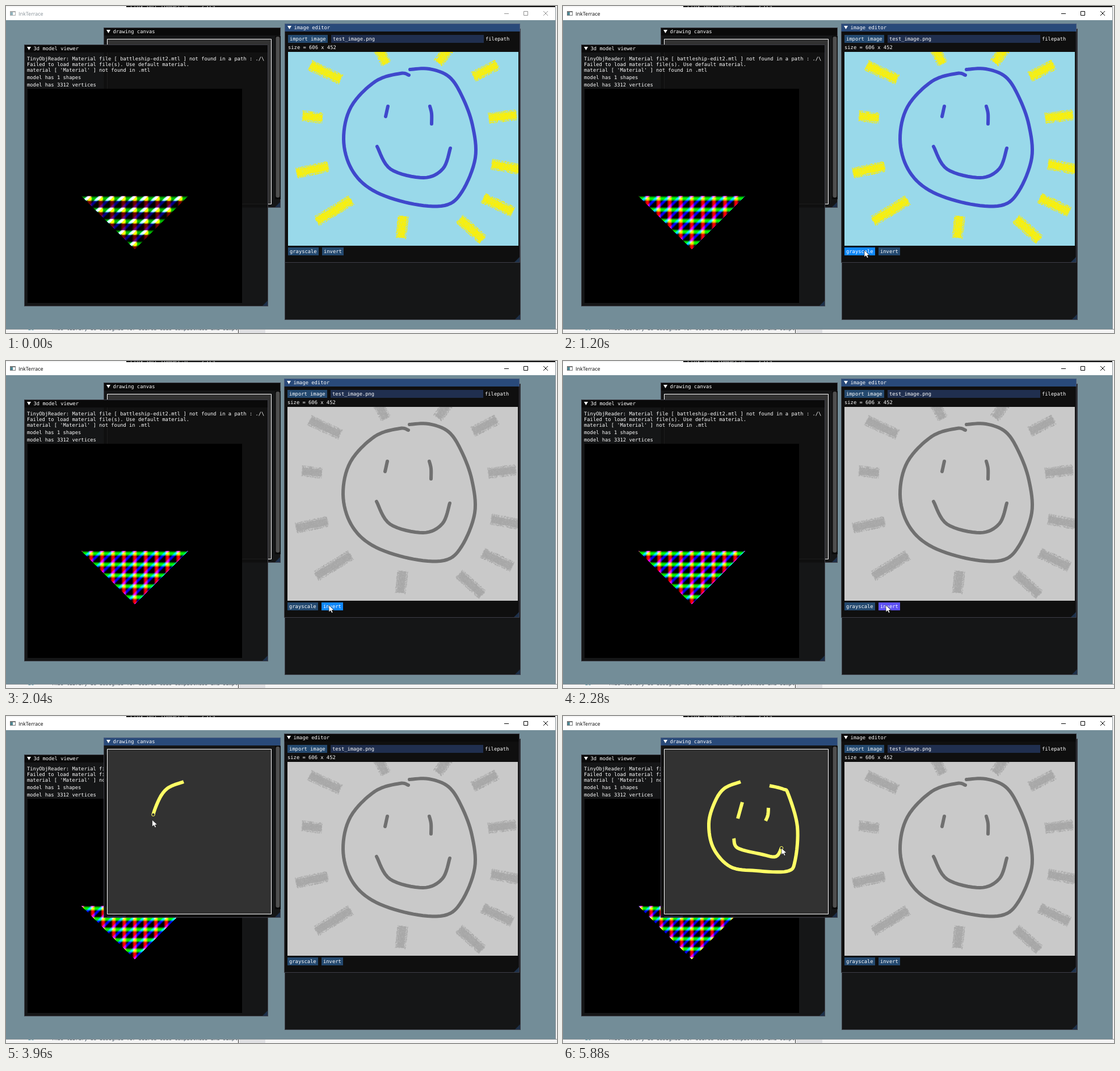
An HTML page with a canvas that plays this animation: 971x577 px, repeating every 6 s.

```html
<!DOCTYPE html>
<html lang="en">
<head>
<meta charset="utf-8">
<style>
html, body { margin: 0; width: 100%; height: 100%; overflow: hidden; background: #738d98; }
canvas { display: block; }
</style>
</head>
<body>
<canvas id="stage" width="971" height="577"></canvas>
<script>
const ctx = document.getElementById('stage').getContext('2d');
const LOOP = 6000, STEP = 120;
const MONO = '8.8px "DejaVu Sans Mono", monospace';
const UI = '9px "Open Sans", sans-serif';
const BLUE = '#294a7a', BUTTON = '#24496f', FIELD = '#202f4f';

function rect(x, y, w, h, color) {
  ctx.fillStyle = color;
  ctx.fillRect(x, y, w, h);
}

function frame(x, y, w, h, color) {
  ctx.strokeStyle = color;
  ctx.lineWidth = 1;
  ctx.strokeRect(x + .5, y + .5, w - 1, h - 1);
}

function poly(color, ...p) {
  ctx.fillStyle = color;
  ctx.beginPath();
  for (let i = 0; i < p.length; i += 2) ctx.lineTo(p[i], p[i + 1]);
  ctx.closePath();
  ctx.fill();
}

function text(s, x, y, color = '#fff', font = MONO) {
  ctx.font = font;
  ctx.fillStyle = color;
  ctx.fillText(s, x, y + 3);
}

function clipped(x, y, w, h, paint) {
  ctx.save();
  ctx.beginPath();
  ctx.rect(x, y, w, h);
  ctx.clip();
  paint();
  ctx.restore();
}

function button(label, x, y, w, color = BUTTON) {
  rect(x, y, w, 14, color);
  text(label, x + 3, y + 7);
}

function panel(x, y, w, h, title, active) {
  rect(x, y, w, h, 'rgba(15,15,15,.94)');
  if (title) {
    rect(x, y, w, 14, active ? BLUE : '#0a0a0a');
    poly('#fff', x + 5, y + 4, x + 12, y + 4, x + 8.5, y + 10);
    text(title, x + 16.5, y + 7);
  }
  frame(x, y, w, h, 'rgba(110,110,128,.5)');
  poly('#1d304a', x + w - 1, y + h - 10, x + w - 1, y + h - 1, x + w - 10, y + h - 1);
}

function offscreen(w, h) {
  const c = document.createElement('canvas');
  c.width = w;
  c.height = h;
  return c;
}

// Catmull-Rom curve through a few key points, as a list of points
function curve(...k) {
  const n = k.length / 2, out = [];
  const at = (i, d) => k[Math.min(n - 1, Math.max(0, i)) * 2 + d];
  const mix = (i, u, d) => {
    const a = at(i - 1, d), b = at(i, d), c = at(i + 1, d), e = at(i + 2, d);
    return b + u / 2 * (c - a + u * (2 * a - 5 * b + 4 * c - e + u * (3 * (b - c) + e - a)));
  };
  for (let s = 0; s <= (n - 1) * 8; s++) {
    const i = Math.floor(s / 8), u = s / 8 - i;
    out.push([mix(i, u, 0), mix(i, u, 1)]);
  }
  return out;
}

function stroke(g, points, color, width) {
  g.strokeStyle = color;
  g.lineWidth = width;
  g.lineJoin = 'round';
  g.beginPath();
  for (const p of points) g.lineTo(...p);
  g.stroke();
}

// Smiling sun picture
const SUN = [
  curve(709,122, 694,119, 650,133, 607,178, 594,235, 608,288, 645,325, 710,348, 772,352,
    803,327, 826,268, 821,210, 803,160, 780,125, 745,111, 711,112),
  curve(672,177, 668,195),
  curve(746,177, 749,190, 749,208),
  curve(653,248, 677,288, 735,303, 769,287, 782,251)
];
// Ray middles and lengths
const RAYS = [[562,117,58], [662,88,30], [770,88,30], [844,114,46], [874,195,48], [881,284,52],
  [866,351,56], [819,394,54], [697,390,38], [577,361,70], [539,289,56], [539,196,34]];

function makeSun(bg, ink, ray) {
  const c = offscreen(406, 342), g = c.getContext('2d');
  let seed = 7;
  const rnd = () => (seed = seed * 16807 % 2147483647) / 2147483647;
  g.fillStyle = bg;
  g.fillRect(0, 0, 406, 342);
  g.translate(-496, -81);
  for (const [x, y, len] of RAYS) {
    g.save();
    g.translate(x, y);
    g.rotate(Math.atan2((y - 228) * .6, x - 708));
    g.fillStyle = ray;
    g.globalAlpha = .77;
    g.fillRect(-len / 2, -6, len, 12);
    for (let i = 0; i < len * 13; i++)
      g.fillRect((rnd() - .5) * (len + 2) - .6, (rnd() - .5) * 19 - .6, 1.2, 1.2);
    g.restore();
  }
  g.lineCap = 'round';
  for (const p of SUN) stroke(g, p, ink, 6);
  return c;
}

const suns = {
  color: makeSun('#99d9ea', '#3f48cc', '#fff200'),
  gray: makeSun('#c9c9c9', '#707070', '#a6a6a6'),
  inverted: makeSun('#363636', '#8f8f8f', '#595959')
};

// Shaded triangle: red columns, green rows, blue diagonals
const TW = 190, TH = 96;
const tri = offscreen(TW, TH);
const tctx = tri.getContext('2d');
const pixels = tctx.createImageData(TW, TH);

function shade(t) {
  const k = 2 * Math.PI * (.05 + t * 1e-6);
  const dim = Math.max(0, 1 - t / 480);
  for (let j = 0; j < TH; j++) for (let i = 0; i < TW; i++) {
    const x = i + .5 - TW / 2, y = j + .5, o = (j * TW + i) * 4;
    const r = Math.max(0, Math.cos(k * x));
    const g = Math.max(0, Math.sin(k * y));
    const b = Math.max(0, Math.cos(k * (x + y)));
    const node = dim * r * g, shine = dim * g * b;
    pixels.data[o] = 255 * (r * (1 - .55 * dim) + node + shine);
    pixels.data[o + 1] = 255 * (g * (1 - .25 * dim) + node * .7 + shine);
    pixels.data[o + 2] = 255 * (b * (1 - .45 * dim) + shine);
    pixels.data[o + 3] = Math.abs(x) < 94.5 - y ? 255 : 0;
  }
  tctx.putImageData(pixels, 0, 0);
}

// Hand drawing
const INK = [
  { from: 3740, to: 4980, line: curve(313,116, 284,128, 267,153, 257,190, 265,233, 295,266,
    340,273, 395,274, 409,255, 413,195, 397,138, 388,129, 364,123) },
  { from: 5040, to: 5160, line: curve(316,152, 308,181) },
  { from: 5220, to: 5320, line: curve(362,162, 361,175, 357,185) },
  { from: 5440, to: 5880, line: curve(301,216, 308,233, 350,244, 375,248, 385,233) }
];

// The drawn part of a line at time t
function drawn({ from, to, line }, t) {
  const seg = line.slice(1).map(([x, y], i) => Math.hypot(x - line[i][0], y - line[i][1]));
  const f = Math.min(1, Math.max(0, (t - from) / (to - from)));
  let left = f * seg.reduce((a, b) => a + b);
  const out = [line[0]];
  for (let i = 0; i < seg.length && left > 0; left -= seg[i++]) {
    const u = Math.min(1, left / seg[i]);
    out.push(line[i].map((v, d) => v + (line[i + 1][d] - v) * u));
  }
  return out;
}

// Pointer stops: time, x, y
const STOPS = [[240, 600, 38], [1080, 531, 431], [1440, 531, 431], [1680, 569, 431],
  [2760, 569, 431], [3120, 340, 48], [3360, 340, 48]];
for (const { from, to, line } of INK) STOPS.push([from, ...line[0]], [to, ...line.at(-1)]);

function pointer(t) {
  const s = INK.find(({ from, to }) => t >= from && t <= to);
  if (s) return drawn(s, t + 25).pop();
  const i = STOPS.findIndex(k => k[0] > t);
  if (i < 1) return null;
  const [a, x, y] = STOPS[i - 1], [b, x2, y2] = STOPS[i];
  const u = (t - a) / (b - a), e = u * u * (3 - 2 * u);
  return [x + (x2 - x) * e, y + (y2 - y) * e];
}

function desktop(t) {
  const active = t >= 240, tone = active ? '#000' : '#909090';
  rect(0, 0, 971, 577, '#f4f4f4');
  rect(212, 0, 756, 2, '#101010');
  clipped(212, 0, 756, 2, () =>
    text('tiny_obj_loader.h    2319', 218, 0, '#ccc', '10px "DejaVu Sans Mono", monospace'));
  rect(0, 2, 968, 23, '#fff');
  rect(0, 25, 968, 545, '#738d98');
  rect(0, 570, 971, 1, '#8b9498');
  rect(968, 2, 1, 569, '#8b9498');
  rect(411, 571, 46, 6, '#e0e0e3');
  rect(409, 571, 1, 6, '#333');
  clipped(0, 571, 409, 6, () => {
    text('26', 39, 569, '#2b7a91');
    text('This library is designed for source code compactness and simplici', 80, 569, '#345');
  });
  rect(7, 9, 10, 8, active ? '#777' : '#aaa');
  rect(8, 11, 8, 5, '#fff');
  rect(8, 11, 4, 5, active ? '#4d8794' : '#8fb2bd');
  text('InkTerrace', 22, 13.5, active ? '#000' : '#858f96', UI);
  rect(878, 13, 8, 1, tone);
  frame(912, 9, 8, 8, tone);
  stroke(ctx, [[947, 9], [955, 17]], tone, 1);
  stroke(ctx, [[955, 9], [947, 17]], tone, 1);
}

function viewer() {
  panel(32, 68, 430, 462, '3d model viewer');
  text('TinyObjReader: Material file [ battleship-edit2.mtl ] not found in a path : ./\\', 37, 93);
  text('Failed to load material file(s). Use default material.', 37, 103);
  text("material [ 'Material' ] not found in .mtl", 37, 113);
  text('model has 1 shapes', 37, 126);
  text('model has 3312 vertices', 37, 139);
  rect(38, 146, 378, 378, '#000');
  ctx.drawImage(tri, 132, 335);
}

function drawing(t, active) {
  panel(172, 38, 312, 318, 'drawing canvas', active);
  rect(474, 53, 10, 288, '#0b0b0b');
  ctx.fillStyle = '#4f4f4f';
  ctx.beginPath();
  ctx.roundRect(475.5, 54, 7, 284, 3);
  ctx.fill();
  rect(178, 58, 290, 292, '#323232');
  frame(178, 58, 290, 292, '#fff');
  rect(178, 353, 33, 1.5, '#1d304a');
  for (const s of INK.filter(s => t >= s.from)) {
    const line = drawn(s, t);
    stroke(ctx, line, '#ffff66', 6);
    if (t > s.to) continue;
    ctx.lineWidth = 1;
    ctx.fillStyle = '#323232';
    ctx.beginPath();
    ctx.arc(...line.pop(), 2.8, 0, 7);
    ctx.fill();
    ctx.stroke();
  }
}

function editor(t, active) {
  const p = pointer(t);
  const over = (x, w) => p && p[0] >= x && p[0] < x + w && p[1] >= 426 && p[1] < 440;
  const tint = (x, w, down) => down ? '#5d50f4' : over(x, w) ? '#0f87fa' : BUTTON;
  const mode = t < 1440 ? 'color' : t >= 2400 && t < 2760 ? 'inverted' : 'gray';
  ctx.save();
  if (t < 240) ctx.translate(1, 0);
  panel(490, 31, 415, 422, 'image editor', active);
  button('import image', 496, 51, 70);
  rect(572, 51, 269, 14, FIELD);
  text('test_image.png', 575, 58);
  text('filepath', 844, 58);
  text('size = 606 x 452', 496, 73);
  ctx.drawImage(suns[mode], 496, 81);
  button('grayscale', 496, 426, 54, tint(496, 54, t === 1320));
  button('invert', 556, 426, 38, tint(556, 38, t === 2280 || t === 2640));
  ctx.restore();
}

function cursor(p) {
  if (!p) return;
  ctx.save();
  ctx.translate(...p);
  poly('#fff', 0, 0, 0, 12, 3, 9.4, 5, 13.6, 7, 12.7, 5.2, 8.7, 9, 8.4);
  ctx.strokeStyle = '#000';
  ctx.lineWidth = .6;
  ctx.stroke();
  ctx.restore();
}

function draw(t) {
  const front = t >= 3360;
  shade(t);
  desktop(t);
  panel(491, 40, 416, 514);
  if (!front) drawing(t, false);
  viewer();
  editor(t, !front);
  if (front) drawing(t, true);
  cursor(pointer(t));
}

ctx.textRendering = 'geometricPrecision';
const begin = performance.now();
function tick() {
  const t = (performance.now() - begin) % LOOP;
  draw(Math.floor(t / STEP) * STEP);
  requestAnimationFrame(tick);
}
tick();
</script>
</body>
</html>
```
